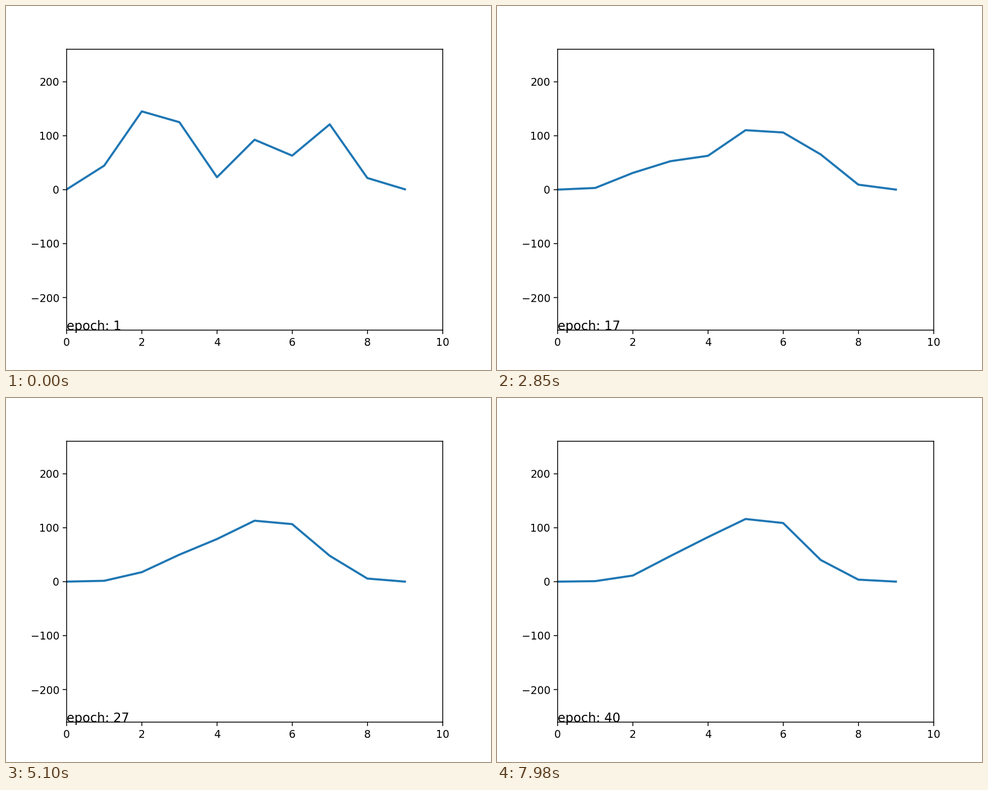
A matplotlib script that plays this animation: 864x648 px, repeating every 8 s.

```python
import numpy as np
import matplotlib.pyplot as plt
from matplotlib.animation import FuncAnimation

LOOP_MS = 8000
INTERVAL = 20
STEP_MS = 30  # the curve and the counter advance once per step

plt.rcParams["font.family"] = "DejaVu Sans"

x = np.arange(10)
START = np.array([0.4, 44.5, 145, 125, 23, 92.5, 63, 121, 21.6, 0.6])
REST = np.array([0, 0, 2, 45.5, 85, 119, 110.5, 25, 0, 0])
HALF = np.array([20, 12, 32, 25, 72, 70, 20, 70, 75, 20])  # steps to halfway
SHARP = 1.25 + 1.15 * np.exp(-1.2 * (x - 4) ** 2)
SWING = np.sign(x - 4.5) * (abs(x - 5) <= 2)  # the middle rocks left and right


def curve(step):
    """Each point settles towards its rest height while the middle rocks."""
    left = 1 / (1 + (step / HALF) ** SHARP)
    rock = 12 * np.exp(-step / 80) * np.sin(2 * np.pi * step / 90)
    return REST + (START - REST) * left + rock * SWING


def epoch(step):
    """Epochs pass quickly at first, then at a steady rate."""
    return int(1.8 + 0.137 * step + 2.5 * (1 - np.exp(-step / 25)))


fig = plt.figure(figsize=(6.4, 4.8), dpi=135, facecolor="white")
fig.subplots_adjust(top=0.881)
ax = fig.add_subplot(xlim=(0, 10), ylim=(-260, 260))
line, = ax.plot(x, curve(0), lw=2, color="#1f77b4")
label = ax.text(0, -260, "", fontsize=12)


def draw(frame):
    step = round(frame * INTERVAL / STEP_MS)
    line.set_ydata(curve(step))
    label.set_text(f"epoch: {epoch(step)}")
    return line, label


anim = FuncAnimation(fig, draw, frames=LOOP_MS // INTERVAL, interval=INTERVAL,
                     init_func=lambda: draw(0), repeat=True, repeat_delay=0)
plt.show()
```
